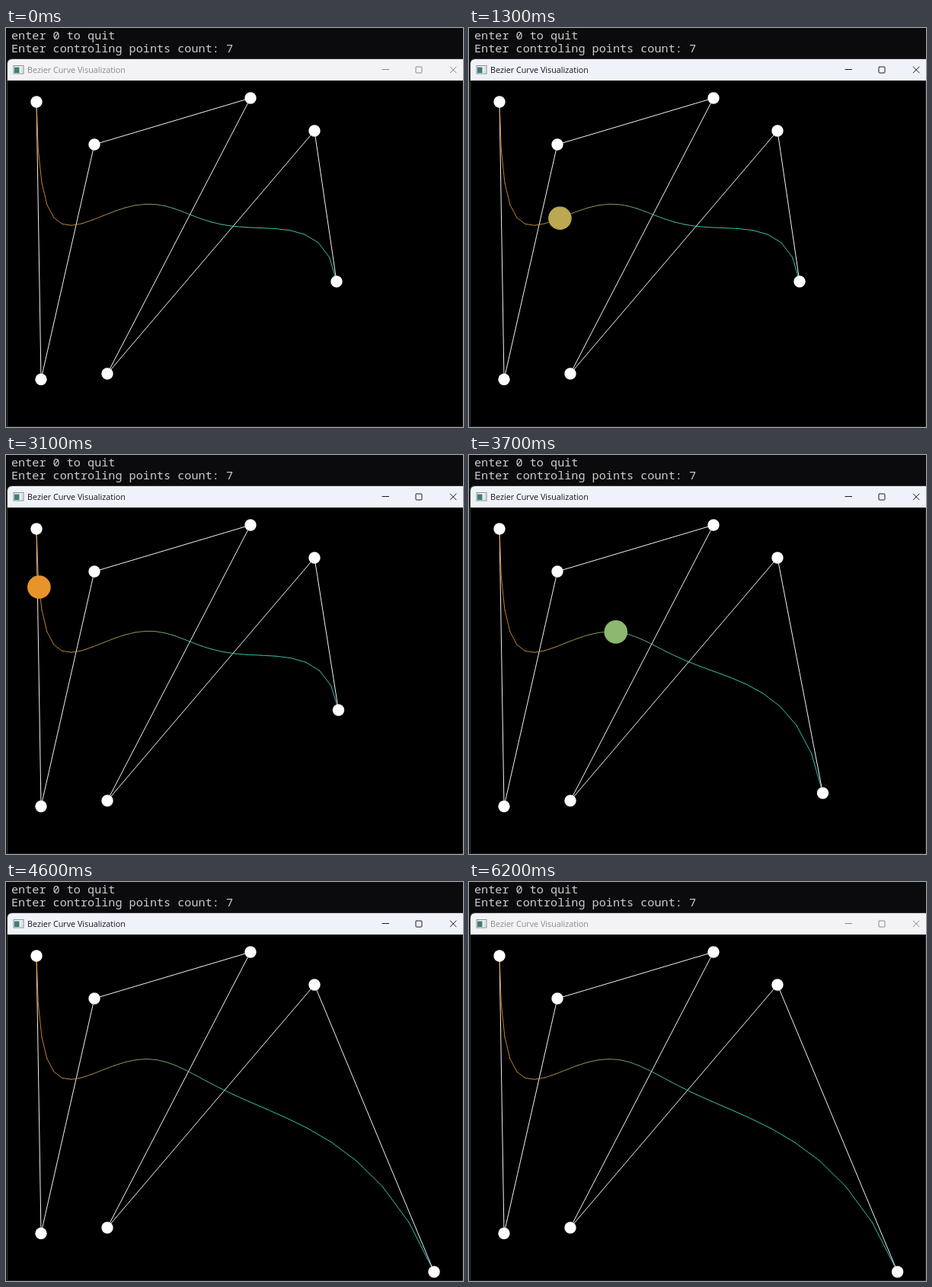
Recreate the animation shown at these times as an HTML page. Size 600 by 524 pixels, loop 6.3 s.

```html
<!DOCTYPE html>
<html lang="en">
<head>
<meta charset="utf-8">
<title>Bezier Curve Visualization</title>
<style>
  html, body { margin: 0; width: 100%; height: 100%; overflow: hidden; background: #000; }
  svg { display: block; }
  .console { font: 15.17px "Noto Sans Mono", "DejaVu Sans Mono", monospace; fill: #ccc; white-space: pre; }
  .title { font: 10.78px "Open Sans", "Noto Sans", sans-serif; }
</style>
</head>
<body>
<svg width="600" height="524" viewBox="0 0 600 524">
  <rect width="600" height="524" fill="#0b0a0d"/>
  <text class="console" x="7" y="14.5">enter 0 to quit</text>
  <text class="console" x="7" y="32">Enter controling points count: 7</text>

  <path d="M1.5 524V47q0-6.5 6.5-6.5H600V524Z" fill="#000" stroke="#3a3a3a"/>
  <path id="bar" d="M2 69V47q0-6 6-6H600V69Z"/>
  <g>
    <rect x="10" y="49.5" width="13" height="10.5" fill="#f4f6f6" stroke="#868b8d"/>
    <rect x="11" y="51.5" width="6.5" height="7.5" fill="#3d7f78"/>
    <path d="M19 52.5h3M19 55h3M19 57.5h3" stroke="#c3cacb"/>
  </g>
  <text id="title" class="title" x="28" y="59">Bezier Curve Visualization</text>
  <path id="buttons" d="M493.5 54.5h9.5M538.5 51h6.5q1 0 1 1v6q0 1-1 1h-6q-1 0-1-1v-6q0-1 1-1M583 50.7l8.4 8.4M591.4 50.7l-8.4 8.4" fill="none"/>

  <polyline id="hull" fill="none" stroke="#f2f2f2"/>
  <g id="curve" stroke-linecap="round" opacity=".86"></g>
  <g id="dots" fill="#fff"></g>
  <circle id="ball" r="15.3"/>
</svg>
<script>
const LOOP = 6300, STEP = 100, SEGMENTS = 30, SPEED = 0.00069;
const FOCUS = [400, 6200];
const RUNS = [[894, 2344], [3038, 4490], [4995, 6150]];
const FIXED = [[40, 97], [46, 461.5], [116, 153], [321, 92], [133, 454], [405, 135]];
// Time, x, y of the dragged last point
const DRAG = [
  [2700, 434, 333], [2800, 436.5, 335], [3100, 436.5, 335], [3300, 441, 354],
  [3500, 450, 386], [3700, 464.5, 444], [4200, 484, 490], [4600, 562, 512], [4800, 562.6, 512]
];
const COLORS = [
  [0, 236, 145, 40], [0.05, 232, 147, 44], [0.28, 188, 167, 82],
  [0.46, 140, 184, 112], [0.75, 62, 225, 201], [1, 62, 225, 205]
];
const BINOMIAL = [1, 6, 15, 20, 15, 6, 1];

const $ = id => document.getElementById(id);

function add(parent, tag, attrs) {
  const el = document.createElementNS("http://www.w3.org/2000/svg", tag);
  set(el, attrs);
  return parent.appendChild(el);
}

function set(el, attrs) {
  for (const key in attrs) el.setAttribute(key, attrs[key]);
}

// Linear interpolation through rows of [key, ...values]
function sample(rows, key) {
  if (key <= rows[0][0]) return rows[0].slice(1);
  const i = rows.findIndex(row => row[0] >= key);
  if (i < 0) return rows[rows.length - 1].slice(1);
  const a = rows[i - 1], b = rows[i];
  const k = (key - a[0]) / (b[0] - a[0]);
  return a.slice(1).map((v, j) => v + (b[j + 1] - v) * k);
}

function bezier(points, u) {
  let x = 0, y = 0;
  points.forEach((p, i) => {
    const w = BINOMIAL[i] * u ** i * (1 - u) ** (6 - i);
    x += w * p[0];
    y += w * p[1];
  });
  return [x, y];
}

const color = u => `rgb(${sample(COLORS, u).map(Math.round)})`;

const segments = Array.from({ length: SEGMENTS }, (_, i) =>
  add($("curve"), "line", { stroke: color((i + 0.5) / SEGMENTS) }));
const dots = Array.from({ length: 7 }, () => add($("dots"), "circle", { r: 7.7 }));

function draw(t) {
  const active = t >= FOCUS[0] && t < FOCUS[1];
  set($("bar"), { fill: active ? "#f0f2fa" : "#f3f2f4" });
  set($("title"), { fill: active ? "#161616" : "#8b8b8d" });
  set($("buttons"), { stroke: active ? "#1c1c1c" : "#8b8b8d" });

  const points = [...FIXED, sample(DRAG, t)];
  set($("hull"), { points: points.join(" ") });
  dots.forEach((dot, i) => set(dot, { cx: points[i][0], cy: points[i][1] }));

  segments.forEach((line, i) => {
    const [x1, y1] = bezier(points, i / SEGMENTS);
    const [x2, y2] = bezier(points, (i + 1) / SEGMENTS);
    set(line, { x1, y1, x2, y2 });
  });

  const run = RUNS.find(([from, to]) => t >= from && t < to);
  set($("ball"), { visibility: run ? "visible" : "hidden" });
  if (run) {
    const u = Math.min(1, (t - run[0]) * SPEED);
    const [cx, cy] = bezier(points, u);
    set($("ball"), { cx, cy, fill: color(u) });
  }
}

const start = performance.now();
function tick() {
  const t = (performance.now() - start) % LOOP;
  draw(Math.floor(t / STEP) * STEP);
  requestAnimationFrame(tick);
}
tick();
</script>
</body>
</html>
```
